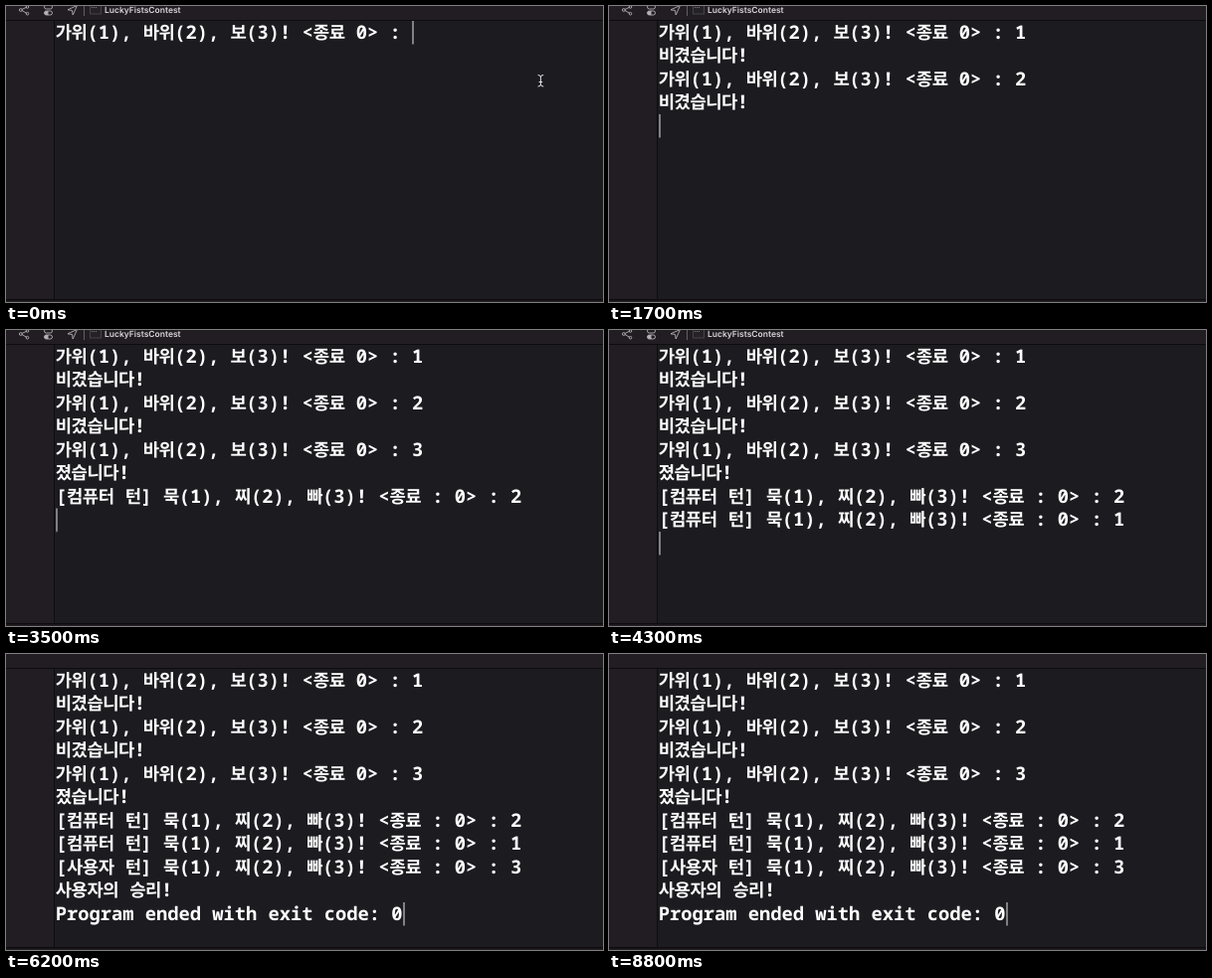
These frames come from a looping animation (600 px wide and 298 px high, 9 s). An HTML page:

```html
<!DOCTYPE html>
<html lang="ko">
<head>
<meta charset="utf-8">
<title>Console game</title>
<style>
@property --t { syntax: "<number>"; inherits: true; initial-value: 0; }
html, body { margin: 0; width: 100%; height: 100%; overflow: hidden; background: #1c1b20; }
svg { display: block; width: 600px; height: 298px; animation: clock 9s linear infinite; }
text { text-rendering: geometricPrecision; white-space: pre; }
.row { font: 800 18.75px "Noto Sans Mono", monospace; fill: #fff; }
.row tspan { fill-opacity: calc(var(--t) - var(--at) + 1); }
.ko { font: 700 17.8px "Noto Sans CJK KR", sans-serif; letter-spacing: -.031em; }
.title { font: 600 8.5px Inter, sans-serif; fill: #d9d5d9; }
#caret { animation: move 9s step-end infinite, blink 9s step-end infinite; }
#tools { animation: leave 9s step-end infinite; }
#mouse { animation: hide 9s step-end infinite; }

@keyframes clock { to { --t: 9000; } }
@keyframes hide { 0% { opacity: 1; } 6.6667%, 100% { opacity: 0; } }
@keyframes leave {
  0% { opacity: 1; } 63.3333% { opacity: .75; } 64.4444% { opacity: .5; }
  65.5556% { opacity: .25; } 66.6667%, 100% { opacity: 0; }
}
@keyframes blink {
  0% { opacity: 1; } 33.3333% { opacity: 0; } 37.7778% { opacity: 1; }
  74.4444% { opacity: .4; } 75.5556% { opacity: 0; } 81.1111% { opacity: 1; }
  85.5556% { opacity: .7; } 86.6667% { opacity: .3; } 87.7778% { opacity: 0; }
  93.3333%, 100% { opacity: 1; }
}
@keyframes move {
  0% { transform: translate(408px, 0); }
  6.6667% { transform: translate(420px, 0); }
  11.1111% { transform: translate(50px, 47px); }
  12.2222% { transform: translate(408px, 47px); }
  17.7778% { transform: translate(420px, 47px); }
  18.8889% { transform: translate(50px, 94px); }
  20% { transform: translate(408px, 94px); }
  25.5556% { transform: translate(420px, 94px); }
  26.6667% { transform: translate(50px, 141px); }
  27.7778% { transform: translate(507px, 141px); }
  37.7778% { transform: translate(518px, 141px); }
  38.8889% { transform: translate(50px, 164.5px); }
  40% { transform: translate(507px, 164.5px); }
  45.5556% { transform: translate(518px, 164.5px); }
  47.7778% { transform: translate(50px, 188px); }
  48.8889% { transform: translate(507px, 188px); }
  55.5556% { transform: translate(518px, 188px); }
  62.2222% { transform: translate(50px, 235px); }
  68.8889%, 100% { transform: translate(399px, 235px); }
}
</style>
</head>
<body>
<svg viewBox="0 0 600 298">
  <path fill="#221d23" d="M0 0H600V14H48V295H600V298H0Z"/>
  <path fill="#0e0c0f" d="M0 14H600V15H49V295H600V296.5H0V295H48V15H0Z"/>

  <g id="tools" fill="none" stroke="#b5b0b5" stroke-width=".9">
    <path d="M16 3.5 21 1M16 4.5 21 7.5"/>
    <circle cx="14.8" cy="4" r="1.4"/>
    <circle cx="21.5" cy="1" r="1.3"/>
    <circle cx="21.5" cy="7.7" r="1.3"/>
    <rect x="38.5" y="-1" width="8" height="4" rx="2"/>
    <rect x="38.5" y="5" width="8" height="4" rx="2"/>
    <path fill="#b5b0b5" stroke="none" d="M38.5 7a2 2 0 0 1 2-2h2v4h-2a2 2 0 0 1-2-2Z"/>
    <path d="M71.5-.5 62 3.8 66.5 4.5 67.2 9Z"/>
    <path stroke="#6b656a" d="M78.5 0V10"/>
    <rect x="84.5" y="-1.5" width="11" height="9.5" fill="#252227" stroke="#4c484d"/>
    <path stroke="#8d888d" stroke-dasharray="1 1" d="M86 1.5H91"/>
    <text class="title" x="99" y="6.7" stroke="none">LuckyFistsContest</text>
  </g>

  <g id="rows"></g>
  <rect id="caret" x=".4" y="15" width="1.2" height="23.5" fill="#c4c3c6"/>

  <g id="mouse" fill="none" stroke-linecap="round">
    <path id="beam" stroke="#e8e8e8" d="M535 69.5Q537.4 69.5 537.4 71.5Q537.4 69.5 539.8 69.5M537.4 71.5V79M536 76.5H538.8M535 81Q537.4 81 537.4 79Q537.4 81 539.8 81"/>
  </g>
</svg>
<script>
const ASK = "가위(1), 바위(2), 보(3)! <종료 0> : ";
const TURN = " 턴] 묵(1), 찌(2), 빠(3)! <종료 : 0> : ";

// Each row alternates text and the time it appears.
const rows = [
  [ASK, 0, "1", 600],
  ["비겼습니다!", 1000],
  [ASK, 1100, "2", 1600],
  ["비겼습니다!", 1700],
  [ASK, 1800, "3", 2300],
  ["졌습니다!", 2400],
  ["[컴퓨터" + TURN, 2500, "2", 3400],
  ["[컴퓨터" + TURN, 3600, "1", 4100],
  ["[사용자" + TURN, 4400, "3", 5000],
  ["사용자의 승리!", 5600],
  ["Program ended with exit code: 0", 6200]
];

function add(parent, tag, attrs, text = "") {
  const el = document.createElementNS("http://www.w3.org/2000/svg", tag);
  for (const key in attrs) el.setAttribute(key, attrs[key]);
  el.textContent = text;
  return parent.appendChild(el);
}

const box = document.getElementById("rows");
rows.forEach((parts, i) => {
  const line = add(box, "text", { class: "row", x: 49.8, y: 32.5 + i * 23.5 });
  for (let k = 0; k < parts.length; k += 2) {
    for (const run of parts[k].match(/[가-힣]+|[^가-힣]+/g)) {
      add(line, "tspan", {
        class: /[가-힣]/.test(run) ? "ko" : "en",
        style: `--at: ${parts[k + 1]}`
      }, run);
    }
  }
});
</script>
</body>
</html>
```
